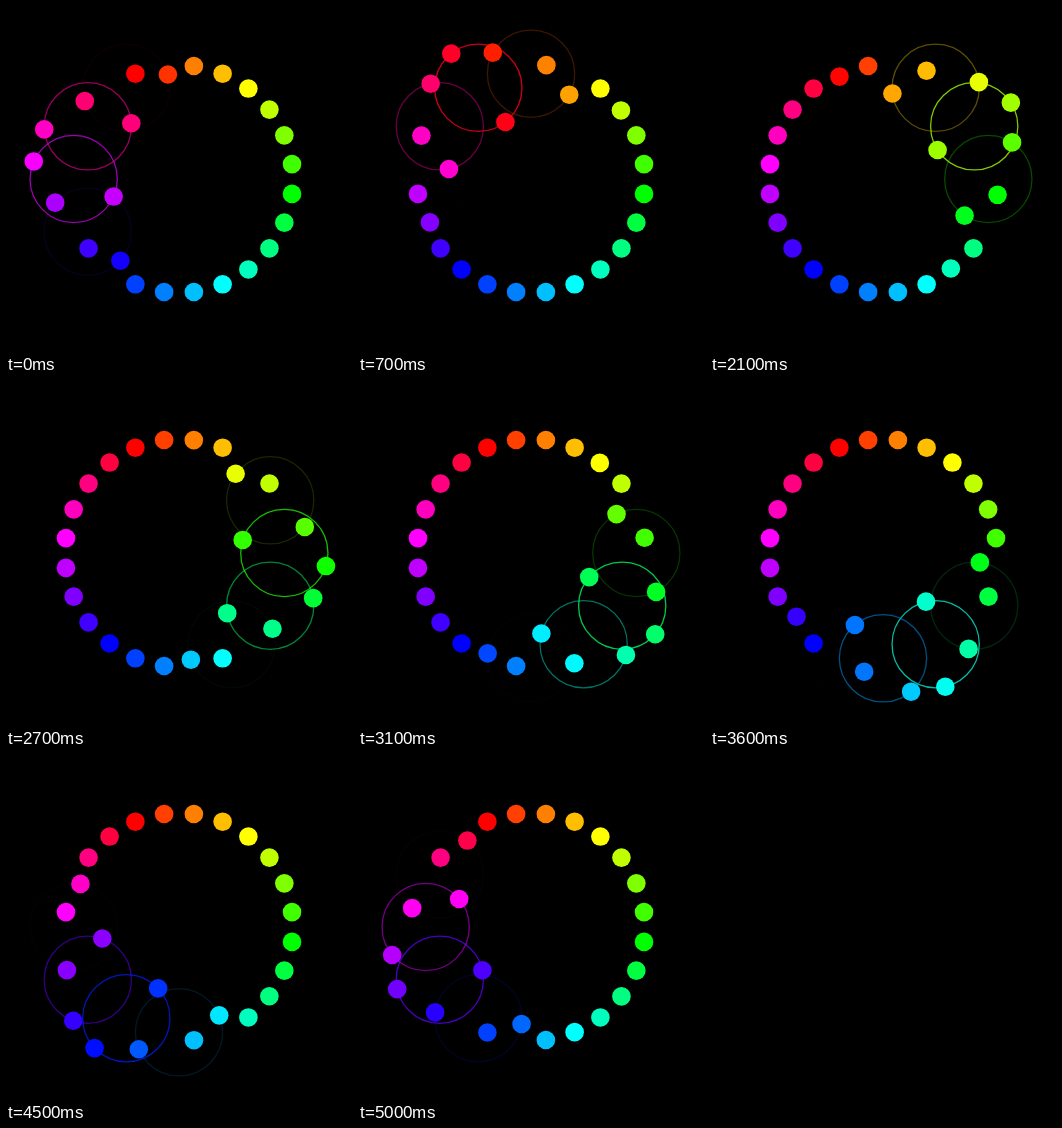
Write an HTML page with a canvas that moves like this. It is 346 px wide and 346 px high and loops after 5100 ms.

```html
<!DOCTYPE html>
<html>
<head>
<meta charset="utf-8">
<style>
  html, body { margin: 0; width: 100%; height: 100%; overflow: hidden; background: #000; }
  canvas { display: block; }
</style>
</head>
<body>
<canvas id="stage" width="346" height="346"></canvas>
<script>
const ctx = document.getElementById('stage').getContext('2d');
const LOOP = 5100, STEP = 100;
const CENTER = 173, RADIUS = 114, DOT = 9.3;
const PAIRS = 12, STAGGER = 2.5 / PAIRS;
const HALF = Math.PI / 8;                 // half the angle between swapping dots
const ORBIT = RADIUS * Math.cos(HALF);    // distance of ring centres
const RING = RADIUS * Math.sin(HALF);

// Slightly uneven pacing: [ms, phase]
const PACE = [[0, -.04], [700, .262], [1500, .626], [2700, 1.187],
              [3600, 1.603], [4500, 2.018], [5000, 2.229], [5100, 2.272]];

function phaseAt(t) {
  const i = PACE.findIndex(([ms]) => ms > t);
  const [t0, a] = PACE[i - 1], [t1, b] = PACE[i];
  return a + (b - a) * (t - t0) / (t1 - t0);
}

const color = (hue, alpha = 1) => `hsla(${(hue + 360) % 360}, 100%, 50%, ${alpha})`;

function circle(x, y, r) {
  ctx.beginPath();
  ctx.arc(x, y, r, 0, 2 * Math.PI);
}

function dot(x, y, hue) {
  circle(x, y, DOT);
  ctx.fillStyle = color(hue);
  ctx.fill();
}

function draw(t) {
  const phase = phaseAt(t);
  ctx.fillStyle = '#000';
  ctx.fillRect(0, 0, 346, 346);

  const pairs = Array.from({ length: PAIRS }, (_, k) => {
    const angle = k * 2 * Math.PI / PAIRS;
    const local = (phase - k * STAGGER + 5) % 2.5;
    return {
      angle,
      x: CENTER + ORBIT * Math.sin(angle),
      y: CENTER - ORBIT * Math.cos(angle),
      hue: k * 360 / PAIRS + 22.5,
      time: Math.min(local, 1)
    };
  });

  ctx.lineWidth = 1.3;
  for (const { x, y, hue, time } of pairs) {
    circle(x, y, RING);
    ctx.strokeStyle = color(hue, .8 * Math.sin(Math.PI * time) ** 4);
    ctx.stroke();
  }

  // Each pair turns half way round while its two hues trade places.
  for (const { angle, x, y, hue, time } of pairs) {
    const p = (1 - Math.cos(Math.PI * time)) / 2;
    const turn = angle + Math.PI * (1 + p);
    const dx = RING * Math.cos(turn), dy = RING * Math.sin(turn);
    const shift = 45 * (p - .5);
    dot(x + dx, y + dy, hue + shift);
    dot(x - dx, y - dy, hue - shift);
  }
}

const start = performance.now();
function frame() {
  const t = (performance.now() - start) % LOOP;
  draw(Math.floor(t / STEP) * STEP);
  requestAnimationFrame(frame);
}
frame();
</script>
</body>
</html>
```
